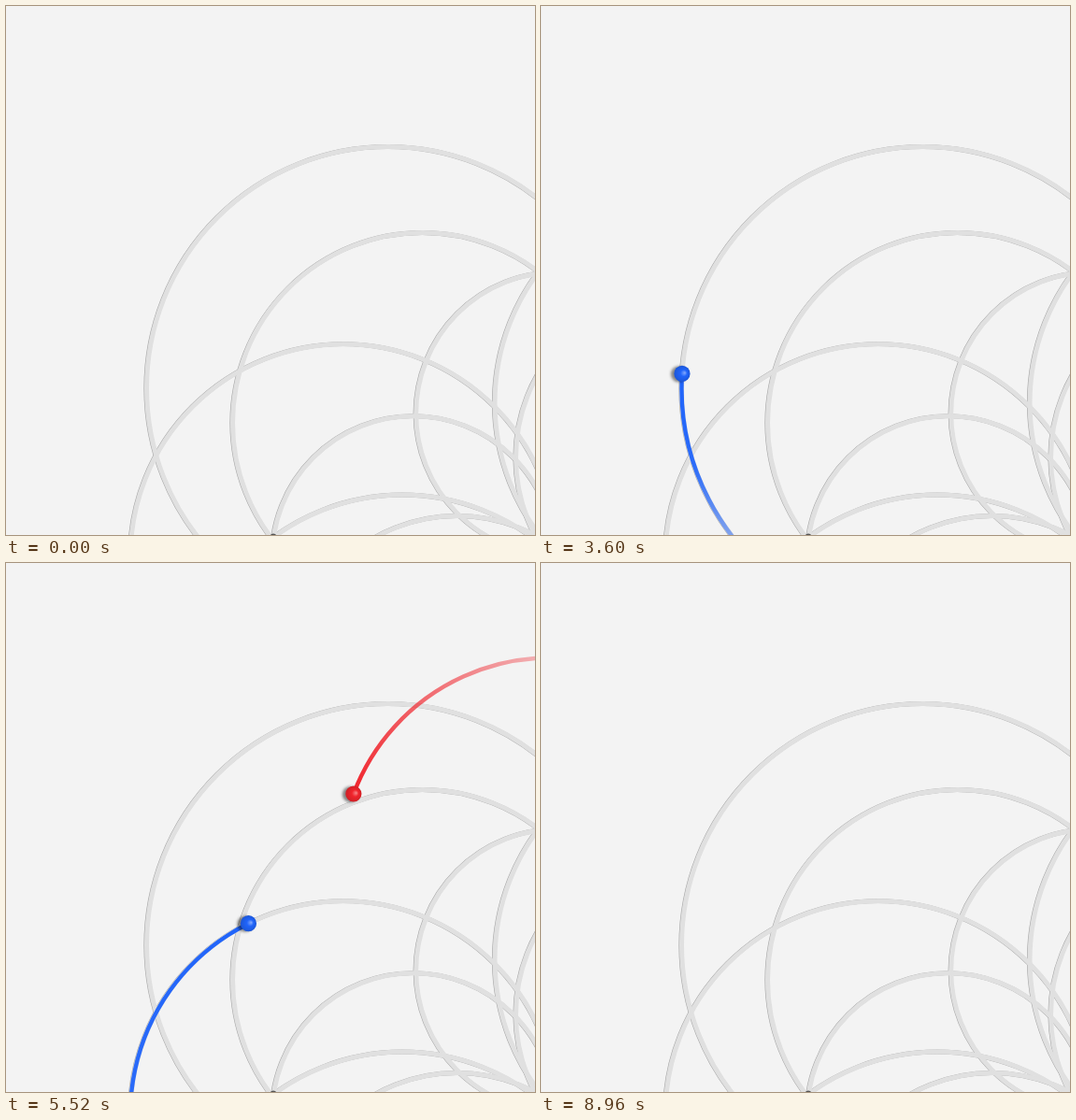
These frames come from a looping animation (566x566 px, 9.04 s). An HTML page with a canvas:

```html
<!DOCTYPE html>
<html lang="en">
<head>
<meta charset="utf-8">
<title>Orbits</title>
<style>
html, body { margin: 0; width: 100%; height: 100%; overflow: hidden; background: #f3f3f3; }
canvas { display: block; }
</style>
</head>
<body>
<canvas id="stage" width="566" height="566"></canvas>
<script>
const ctx = document.getElementById('stage').getContext('2d');
const LOOP = 9040, STEP = 80, HIT = 5696, TAU = 2 * Math.PI, RAD = Math.PI / 180;
const RED = [240, 36, 44], BLUE = [32, 100, 250], PURPLE = [136, 64, 238];

const circle = (x, y, r) => ({ x, y, r });
const mirror = ({ x, y, r }) => circle(y, x, r);
const outer = circle(409, 409, 258.5), middle = circle(446, 446, 203.5);
const low = circle(361.3, 590, 228.3), side = circle(590, 436, 151.3);
const pairs = [side, circle(756, 424.5, 233), circle(724, 483, 178.5)];
const rings = [outer, middle, low, ...pairs, ...pairs.map(mirror)];

// Angle in degrees that passes a0 at t0 and a1 at t1, and goes on beyond both.
const glide = (t0, a0, t1, a1, ease = 1) => t => {
  const k = (t - t0) / (t1 - t0);
  return a0 + (a1 - a0) * Math.sign(k) * Math.abs(k) ** ease;
};

// The last blue ball is struck at the top of its circle, then gathers speed again.
const approach = glide(5520, 243.5, HIT, 270);
const rebound = glide(HIT, 270, 6240, 286.6, 1.38);
const strike = glide(5520, 200.6, HIT, 171.2);

// lag: how far the tail is behind in time; soft: part of the trail that fades
const runs = [
  { path: circle(333, 445, 391), color: RED, show: [960, 1920], lag: 341, soft: 1,
    head: glide(960, 210.5, 1440, 281.4, 1.8) },
  { path: side, color: BLUE, show: [2080, 3000], lag: 350,
    head: glide(2110, 264.3, 2480, 160.3) },
  { path: outer, color: BLUE, show: [3360, 4680], lag: 350,
    head: glide(3360, 141, 4320, 310.8) },
  { path: middle, color: PURPLE, show: [4000, 4960], lag: 350,
    head: glide(4030, 141, 4320, 228.2) },
  { path: circle(582, 326, 224.5), color: RED, show: [5120, 6400], lag: 590, soft: 1, ballEnd: HIT,
    head: t => strike(Math.min(t, HIT)) },
  { path: low, color: BLUE, show: [5040, 8960], lag: 640, soft: 0.4,
    head: t => t < HIT ? approach(t) : rebound(t),
    drag: t => 0.44 * Math.max(0, t - 6240),
    tint: t => mix(BLUE, PURPLE, Math.max(0, Math.min(1, (t - HIT) / 1000))) }
];

const rgba = (c, a = 1) => `rgba(${c},${a})`;
const mix = (a, b, k) => a.map((v, i) => Math.round(v + (b[i] - v) * k));

function disc(x, y, r, fill) {
  ctx.fillStyle = fill;
  ctx.beginPath();
  ctx.arc(x, y, r, 0, TAU);
  ctx.fill();
}

function arc({ x, y, r }, style, width, from = 0, to = TAU) {
  ctx.strokeStyle = style;
  ctx.lineWidth = width;
  ctx.beginPath();
  ctx.arc(x, y, r, from, to);
  ctx.stroke();
}

function drawTrail(path, tail, head, color, soft) {
  const from = Math.min(tail, head) * RAD, to = Math.max(tail, head) * RAD;
  if (to - from < 0.002) return;
  const grad = ctx.createConicGradient(from, path.x, path.y);
  for (const [k, alpha] of [[0, 0], [soft, 0.95], [1, 1]])
    grad.addColorStop((to - from) / TAU * (head > tail ? k : 1 - k), rgba(color, alpha));
  arc(path, grad, 4.4, from, to);
}

function drawBall({ x: cx, y: cy, r }, angle, color) {
  const x = cx + r * Math.cos(angle * RAD), y = cy + r * Math.sin(angle * RAD);
  const grad = ctx.createRadialGradient(x + 3, y - 1, 0, x, y, 9);
  grad.addColorStop(0, rgba(mix(color, [255, 255, 255], 0.45)));
  grad.addColorStop(0.4, rgba(color));
  grad.addColorStop(1, rgba(mix(color, [0, 0, 0], 0.15)));
  ctx.save();
  ctx.shadowColor = 'rgba(0,0,0,0.45)';
  ctx.shadowBlur = 3;
  ctx.shadowOffsetX = -3.5;
  ctx.shadowOffsetY = 0.5;
  disc(x, y, 8.6, grad);
  ctx.restore();
}

function draw(t) {
  ctx.fillStyle = '#f3f3f3';
  ctx.fillRect(0, 0, 566, 566);
  for (const ring of rings) arc({ ...ring, x: ring.x - 0.7 }, '#a8a8a8', 4.8);
  for (const ring of rings) arc(ring, '#e0e0e0', 5);
  disc(286, 568, 3.5, '#555');

  const live = runs.filter(({ show }) => t >= show[0] && t < show[1]);
  const tint = run => run.tint ? run.tint(t) : run.color;
  for (const run of live) {
    const { path, head, lag, drag = () => 0, soft = 0.65 } = run;
    drawTrail(path, head(t - lag - drag(t)), head(t), tint(run), soft);
  }
  for (const run of live)
    if (t < (run.ballEnd ?? LOOP)) drawBall(run.path, run.head(t), tint(run));
}

const begin = performance.now();
function tick() {
  const t = (performance.now() - begin) % LOOP;
  draw(Math.floor(t / STEP) * STEP);
  requestAnimationFrame(tick);
}
tick();
</script>
</body>
</html>
```
